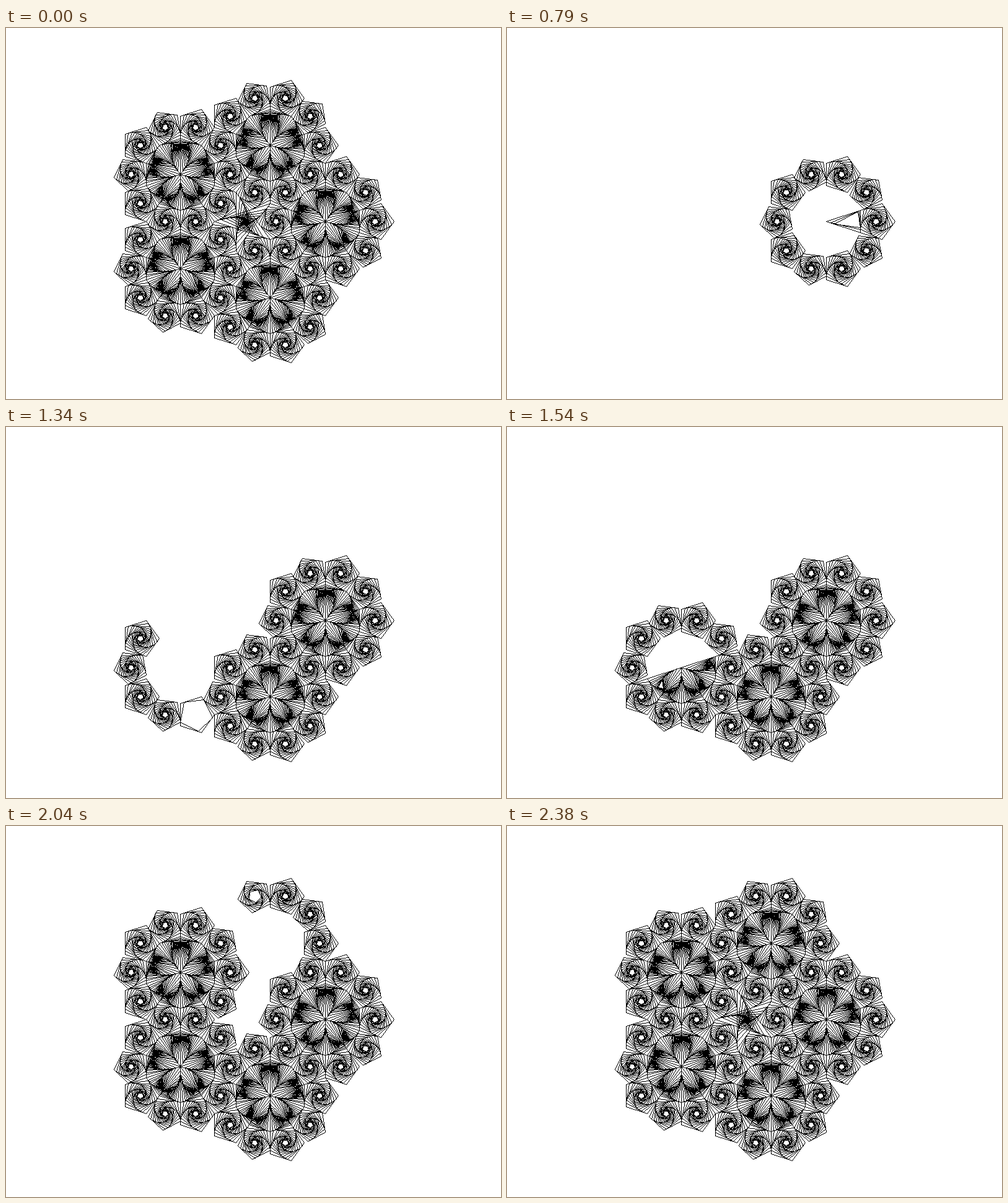
Animation, 799 px wide and 599 px high, one loop 8000 ms. Source, as an HTML page with a canvas:

```html
<!DOCTYPE html>
<html lang="en">
<head>
<meta charset="utf-8">
<title>Whirling pentagons</title>
<style>
  html, body { margin: 0; width: 100%; height: 100%; overflow: hidden; background: #fff; }
  canvas { display: block; }
</style>
</head>
<body>
<canvas id="stage" width="799" height="599"></canvas>
<script>
const WIDTH = 799, HEIGHT = 599, LOOP = 8000;
const CLEAR_AT = 500, HOLD_UNTIL = 600, DRAW_FROM = 510, DONE_AT = 2380;
const PENTAGON_MS = 28, ROSETTE_MS = 78, STAR_MS = 80;

const ctx = document.getElementById("stage").getContext("2d");
const image = ctx.createImageData(WIDTH, HEIGHT);
const pixels = new Uint32Array(image.data.buffer);

const rad = degrees => degrees * Math.PI / 180;
const sin = degrees => Math.sin(rad(degrees));
const polar = (origin, radius, degrees) => ({
  x: origin.x + radius * Math.cos(rad(degrees)),
  y: origin.y + radius * sin(degrees)
});

const SIDE = 35.9;
const PENTAGON_RADIUS = SIDE / (2 * sin(36));
const SPOKE = SIDE / (2 * sin(18));
const RING_RADIUS = SIDE / (2 * Math.tan(rad(18))) + SIDE / (2 * Math.tan(rad(36)));
const FLOWER_RADIUS = RING_RADIUS * sin(72) / sin(36);
const CENTER = { x: 385.8, y: 312 };

// Each polygon is inscribed in the one before it, turned about a fixed pole.
function whirl(points, pole, poleAngle, turn, first, count) {
  const shrink = sin(poleAngle) / sin(poleAngle + Math.abs(turn));
  const polygons = [];
  for (let i = first; i < count; i++) {
    const scale = shrink ** i;
    const c = scale * Math.cos(rad(turn * i)), s = scale * sin(turn * i);
    polygons.push(points.map(p => {
      const x = p.x - pole.x, y = p.y - pole.y;
      return { x: pole.x + x * c - y * s, y: pole.y + x * s + y * c };
    }));
  }
  return polygons;
}

function pentagon(ring, angle) {
  const even = angle / 36 % 2 === 0;
  const center = polar(ring, RING_RADIUS, angle);
  const corners = [0, 72, 144, 216, 288].map(a => polar(center, PENTAGON_RADIUS, angle + a));
  return whirl(corners, center, 54, even ? 10 : -10, even ? 0 : 1, 18);
}

// Ten mirrored triangles share the hub and lean in pairs on every second spoke.
function rosette(hub) {
  const brocard = Math.atan(1 / (1 / Math.tan(rad(36)) + 2 / Math.tan(rad(72)))) * 180 / Math.PI;
  const reach = SPOKE * sin(72 - brocard) / sin(108);
  const polygons = [];
  for (let k = 0; k < 10; k++) {
    const middle = 36 * k, side = k % 2 ? -1 : 1;
    const corners = [hub, polar(hub, SPOKE, middle + 18 * side), polar(hub, SPOKE, middle - 18 * side)];
    const pole = polar(hub, reach, middle - (brocard - 18) * side);
    polygons.push(...whirl(corners, pole, brocard, -5 * side, 0, 20));
  }
  return polygons;
}

function star() {
  const radius = (FLOWER_RADIUS - RING_RADIUS - PENTAGON_RADIUS) / (sin(18) / sin(54));
  const tips = [0, 1, 2, 3, 4].map(i => polar(CENTER, radius, 36 + 144 * i));
  return whirl(tips, CENTER, 18, 5, 0, 14);
}

const strokes = [];
let cursor = DRAW_FROM;

function schedule(polygons, duration) {
  polygons.forEach((points, i) => {
    strokes.push({ points, at: cursor + duration * i / polygons.length });
  });
  cursor += duration;
}

for (let k = 0; k < 5; k++) {
  const ring = polar(CENTER, FLOWER_RADIUS, 72 * k);
  for (let i = 0; i < 10; i++) schedule(pentagon(ring, 72 + 72 * k - 36 * i), PENTAGON_MS);
  schedule(rosette(ring), ROSETTE_MS);
}
schedule(star(), STAR_MS);

// Hard one-pixel line without smoothing.
function line(a, b) {
  let x = Math.round(a.x), y = Math.round(a.y);
  const endX = Math.round(b.x), endY = Math.round(b.y);
  const dx = Math.abs(endX - x), dy = -Math.abs(endY - y);
  const stepX = x < endX ? 1 : -1, stepY = y < endY ? 1 : -1;
  let error = dx + dy;
  while (true) {
    pixels[y * WIDTH + x] = 0xff000000;
    if (x === endX && y === endY) return;
    const twice = 2 * error;
    if (twice >= dy) { error += dy; x += stepX; }
    if (twice <= dx) { error += dx; y += stepY; }
  }
}

function visibleCount(time) {
  if (time < CLEAR_AT || time >= DONE_AT) return strokes.length;
  if (time < HOLD_UNTIL) return 1;
  return strokes.filter(stroke => stroke.at <= time).length;
}

let shown = -1;

function render(now) {
  const count = visibleCount(now % LOOP);
  if (count !== shown) {
    pixels.fill(0xffffffff);
    for (const { points } of strokes.slice(0, count)) {
      points.forEach((p, i) => line(p, points[(i + 1) % points.length]));
    }
    ctx.putImageData(image, 0, 0);
    shown = count;
  }
}

function tick() {
  render(performance.now());
  requestAnimationFrame(tick);
}
tick();
</script>
</body>
</html>
```
